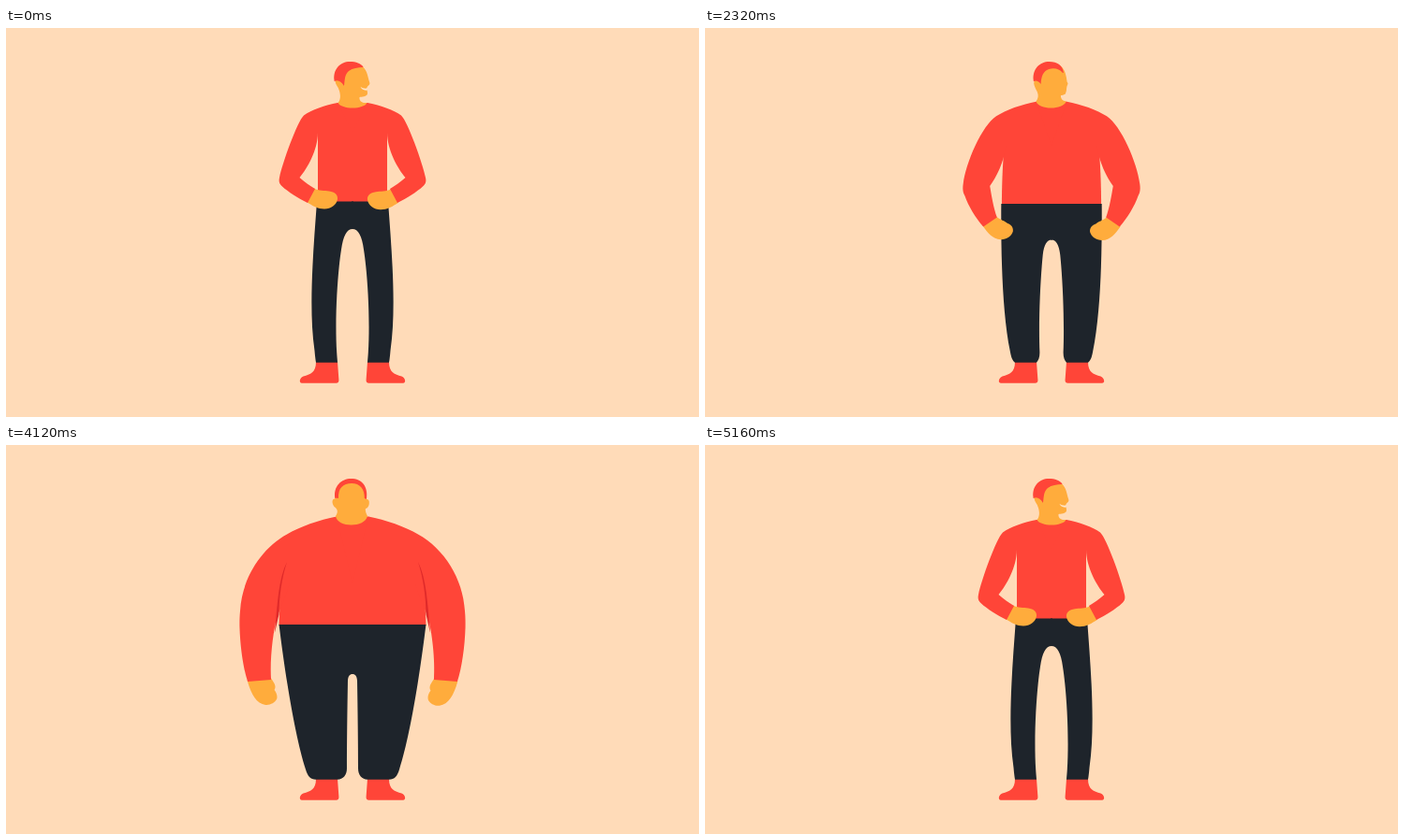
Write an HTML page that moves like this. It is 740 px wide and 416 px high and loops after 6280 ms.

```html
<!DOCTYPE html>
<html lang="en">
<head>
<meta charset="utf-8">
<title>Growing figure</title>
<style>
  html, body { margin: 0; width: 100%; height: 100%; overflow: hidden; background: #ffdbb8; }
  svg { display: block; width: 100vw; height: 100vh; }
</style>
</head>
<body>
<svg id="stage" viewBox="0 0 740 416"></svg>
<script>
const LOOP = 6280, STEP = 40;
const RED = '#ff4538', SKIN = '#ffac3c', DARK = '#1e242b', SHADE = '#df2a2a', PALE = '#ffe6cc';
const NS = 'http://www.w3.org/2000/svg';

// Each shape: fill, slim outline, wide outline with the same commands.
// Sided shapes are drawn for the left and mirrored to the right.
const FOOT = 'M331 357L354 357L355.4 376Q355.8 379.7 352.5 379.7L316 379.7C312.4 379.7 313.5 374 317.5 372.5C325 370.5 331 368.5 331 357Z';

const shapes = [
  { fill: RED, sided: true,
    slim: 'M354 80L333 112C333 140 333 165 333 187L371 187L371 80Z',
    wide: 'M353 76.5L300 125C293.5 150 291.5 180 291.5 193L371 193L371 76.5Z' },
  { fill: RED, sided: true, slim: FOOT, wide: FOOT },
  { fill: DARK, sided: true,
    slim: 'M332 185.5C328 240 323 300 329.5 345C330 351 330.5 355 331 357.7L354 357.7C353.8 354 353.4 351 353.2 347C351 310 354 262 358 237C360 222 364 215 370 215L371 215L371 185.5Z',
    wide: 'M291.5 192C297 238 308 310 320 347C322 354 325 357.7 331 357.7L354 357.7C360 357.7 364 353 364 346C364 320 364.5 280 365 252C365.2 247.5 367 245 370 245L371 245L371 192Z' },
  { fill: SKIN, sided: true, drop: 0.8,
    slim: 'M329 171.5C334 174.5 340 173.5 345 174.5C351 175.5 354.5 178 354 183C353 189 347 193.5 340 193.5C333 193.5 327 190 321 186Z',
    wide: 'M283 249.5C286 254 289 258 286.5 262C289 265 290 269 289 272C287 276 282 278.5 277 278C267 277 261 265 257.5 251.5Z' },
  { fill: RED, sided: true,
    slim: 'M354 80C341 82.5 326 87.5 318 93.5C311 100 295 145 292 160C291 164.5 292 167 295 169.5C301 175 312 182 322 187L330 172C325 169 319 165 313.5 160C322 150 333 130 333 112L370 112Z',
    wide: 'M353 76.5C335 80 313 87.5 300 95.5C272 111 252 143 250 177C249.3 184 249.3 190 249.4 195C250 215 253 238 258 253L283 251C281.5 230 285 200 289.5 183C293 176 298 164 303 148L370 148Z' },
  { fill: SHADE, sided: true, show: p => (p - 0.9) / 0.1,
    slim: 'M333 112C324 132 320 152 317 172C319 169 320 166 321 163C322 146 326 130 333 112Z',
    wide: 'M300 125C291 143 290 168 286.8 201C288.5 195 290 187 291.5 181C291.5 164 294 143 300 125Z' },
  { fill: SKIN,
    slim: 'M354.5 80C358 87.3 382 87.3 385.5 80C380 80.5 377 78 377.5 74C379 73.5 386 73.5 386 70C386.3 67 384.5 65.5 385.5 63.5C386.5 61 389.5 61 388 57.5C386.5 53 386 46 381 41.5C375 38.5 363 37.5 356 43C352 46 351 52 351.5 57C352 61 355 63 355.5 66C357 70 358 76 354.5 80Z',
    wide: 'M352 76C354 88.7 383 88.7 386 76C385 74 384 72 383.8 69.5C383.8 69 383.9 68.5 384 68C386 68 388 65 387.8 61.5C388 59 386.5 57.5 384.5 58C384.8 50 383 42 377 39C371 37 358 40 353 48C352 51 351.5 55 351.5 57.5C348 57 347.5 62 350.5 66C353.5 68 355.5 71 352 76Z' },
  { fill: RED,
    slim: 'M350.5 56C349 44 357 36 367 36C374 36 379 38 381.5 41.5L381 42C376 42 370 43 366 46C361.5 49.5 361.8 56 361 62C358 57 354.5 55 350.5 57Z',
    wide: 'M351.3 57C349.5 44 358 36 368.5 36C380 36 387 44 385 58L382.8 57C383 47 378 41 369 41C360 41 354.5 46 355 57C354 57 353 56.5 351.3 57Z' },
  { fill: PALE, show: p => 1 - p / 0.12,
    slim: 'M378.5 62.8C380 64.5 383 65 385.8 64.6L385.6 66.6C382 67 379.2 65.5 378.5 62.8Z',
    wide: 'M378.5 62.8C380 64.5 383 65 385.8 64.6L385.6 66.6C382 67 379.2 65.5 378.5 62.8Z' }
];

// start, length, from, to, and the two horizontal easing handles
const moves = [
  [580, 1110, 0, 0.387, 0.42, 0.22],
  [2300, 1180, 0.387, 1, 0.5, 0.25],
  [4100, 1060, 1, 0, 0.29, 0.445]
];

const clamp = v => Math.max(0, Math.min(1, v));

// Cubic ease with handles (a, 0) and (b, 1), solved by bisection.
function ease(x, a, b) {
  let lo = 0, hi = 1;
  for (let i = 0; i < 30; i++) {
    const s = (lo + hi) / 2, r = 1 - s;
    if (3 * a * r * r * s + 3 * b * r * s * s + s * s * s < x) lo = s; else hi = s;
  }
  return lo * lo * (3 - 2 * lo);
}

function girth(t) {
  let p = 0;
  for (const [start, length, from, to, a, b] of moves) {
    if (t >= start + length) p = to;
    else if (t > start) p = from + (to - from) * ease((t - start) / length, a, b);
  }
  return p;
}

function mix(slim, wide, p) {
  let i = 0;
  return slim.replace(/[\d.]+/g, n => (+n + (wide[i++] - n) * p).toFixed(2));
}

const stage = document.getElementById('stage');

function addPath(fill, transform) {
  const path = document.createElementNS(NS, 'path');
  path.setAttribute('fill', fill);
  if (transform) path.setAttribute('transform', transform);
  return stage.appendChild(path);
}

for (const s of shapes) {
  s.ends = s.wide.match(/[\d.]+/g).map(Number);
  s.paths = [addPath(s.fill)];
  if (s.sided) s.paths.push(addPath(s.fill, `matrix(-1 0 0 1 740 ${s.drop || 0})`));
}

function draw(t) {
  const p = girth(t);
  for (const s of shapes) {
    const d = mix(s.slim, s.ends, p);
    for (const path of s.paths) {
      path.setAttribute('d', d);
      if (s.show) path.setAttribute('opacity', clamp(s.show(p)));
    }
  }
}

const begin = performance.now();
function tick() {
  const t = (performance.now() - begin) % LOOP;
  draw(Math.floor(t / STEP) * STEP);
  requestAnimationFrame(tick);
}
tick();
</script>
</body>
</html>
```
